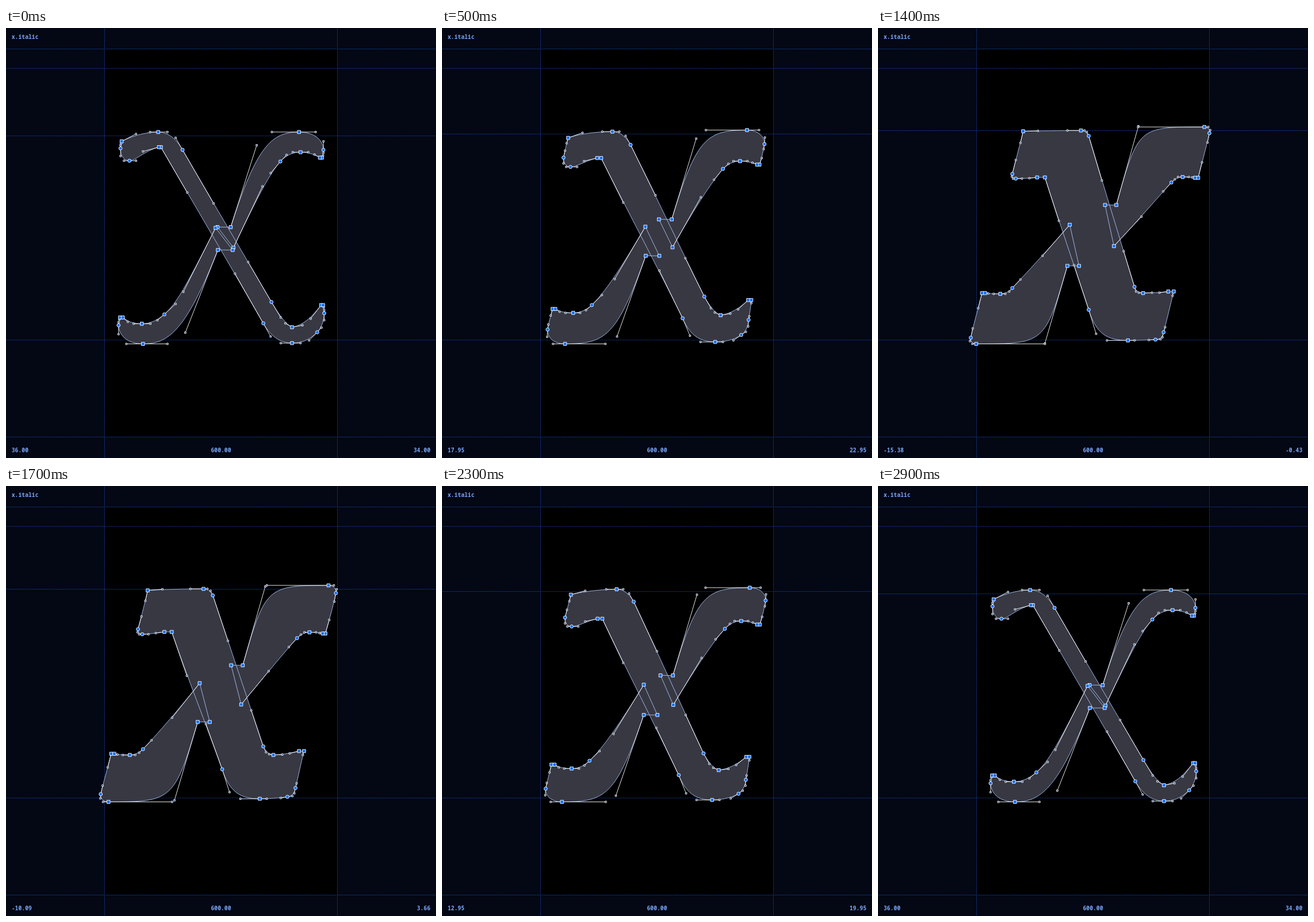
Write an HTML page with a canvas that moves like this. It is 748x748 px and loops after 3 s.

```html
<!DOCTYPE html>
<html lang="en">
<head>
<meta charset="utf-8">
<title>x.italic</title>
<style>
  html, body { margin: 0; width: 100%; height: 100%; overflow: hidden; background: #040714; }
  canvas { display: block; width: 748px; height: 748px; }
</style>
</head>
<body>
<canvas id="stage" width="748" height="748"></canvas>
<script>
const ctx = document.getElementById('stage').getContext('2d');
const SIZE = 748, SCALE = 0.675, LEFT = 171.5, BASE = 542.75, ADVANCE = 600, PAD = 9.75;

// Segments in font units: two numbers for a line, six for a curve.
// nodes: shape of each segment's end node (s = square, c = circle).
const glyph = [
  {
    nodes: 'sccsssccscssccs',
    thin: `81 531 117 536 138 536 | 162 536 183 521 201 490 | 281 352 370 201 430 98 |
      454 58 466 43 483 33 | 510 38 531 55 558 90 | 563 90 | 565 84 566 77 566 69 |
      566 51 559 32 548 20 | 527 -1 505 -8 483 -8 | 454 -8 428 9 409 43 |
      336 171 213 380 145 497 | 140 497 | 99 486 81 462 64 462 | 50 462 41 474 41 494 |
      41 502 42 506 44 512`,
    bold: `160 539 237 539.7 273 539.7 | 281 539.7 287 536 291 527 | 324 413 379 230 406 138 |
      410 127 417 124 427 123.1 | 450 124 469 124 492 126 | 506 126 | 503 115 484 32 480 19 |
      477 6 472 1 459 0 | 442 0 404 -0.6 387 -0.6 | 333 -0.6 305 16 286 79 |
      249 194 212 305 177 417 | 156 417 | 137 415 118 415.1 102 415.1 |
      95 415.1 92 419 93 426 | 103 463 115 508 122 539`
  },
  {
    nodes: 'scssscsss',
    thin: `392 502 431 536 501 536 | 544 536 564 512 564 490 | 564 482 563 475 560 470 |
      555 470 | 541 478 525 484 505 484 | 485 484 469 477 453 460 |
      428 430 407 396 332 238 | 291 291 | 325 291`,
    bold: `418 552 416 549.5 589 549.5 | 598 549.5 603 542 601 534 | 596 510 582 457 571 417 |
      563 417 | 556 417 548 418 532 418 | 520 418 512 412 503 404 |
      482 382 425 316 355 242 | 332 350 | 361.4 350`
  },
  {
    nodes: 'scssscsss',
    thin: `208 19 162 -10 99 -10 | 56 -10 36 15 36 38 | 36 46 38 53 40 58 |
      47 58 | 60 47 75 42 96 42 | 118 42 136 51 154 66 |
      183 93 203 124 286 289 | 330 232 | 292 232`,
    bold: `175 -10 176 -10 -4 -10 | -13 -10 -18.8 -4 -16.9 5 | -11 30 3 83 13 122.6 |
      21 122.6 | 29 122 43 121.6 60 121.6 | 73 121.6 82 127 90 136 |
      111 158 169 220 239 297 | 262 190 | 232 190`
  }
];

const parse = text => text.split('|').map(s => s.trim().split(/\s+/).map(Number));
for (const c of glyph) {
  c.thin = parse(c.thin);
  c.bold = parse(c.bold);
}

const mix = (a, b, t) => a + (b - a) * t;
const px = x => LEFT + x * SCALE;
const py = y => BASE - y * SCALE;

// Weight rises at a steady rate, then falls back slightly faster.
const weightAt = step => step < 15 ? step / 14.4 : (29 - step) / 13.9;

// Interpolated outline on the integer grid, with start points attached.
function outline(t) {
  return glyph.map(c => {
    const segs = c.thin.map((s, i) => s.map((v, j) => Math.round(mix(v, c.bold[i][j], t))));
    return segs.map((s, i) => {
      const prev = segs[(i + segs.length - 1) % segs.length];
      return { p: [...prev.slice(-2), ...s], node: c.nodes[i] };
    });
  });
}

// Exact horizontal extent of the outline.
function extent(contours) {
  let lo = Infinity, hi = -Infinity;
  const add = x => { lo = Math.min(lo, x); hi = Math.max(hi, x); };
  for (const { p } of contours.flat()) {
    add(p[0]);
    if (p.length < 8) continue;
    const [a, , b, , c, , d] = p;
    const A = d - 3 * c + 3 * b - a, B = 2 * (c - 2 * b + a), C = b - a;
    const root = Math.sqrt(B * B - 4 * A * C);
    const roots = A ? [(-B + root) / (2 * A), (-B - root) / (2 * A)] : [-C / B];
    for (const s of roots) {
      if (!(s > 0 && s < 1)) continue;
      const r = 1 - s;
      add(r * r * r * a + 3 * r * r * s * b + 3 * r * s * s * c + s * s * s * d);
    }
  }
  return [lo, hi];
}

function line(x1, y1, x2, y2) {
  ctx.beginPath();
  ctx.moveTo(x1, y1);
  ctx.lineTo(x2, y2);
  ctx.stroke();
}

function marker(x, y, size, round) {
  ctx.beginPath();
  if (round) ctx.arc(x, y, size / 2, 0, Math.PI * 2);
  else ctx.rect(x - size / 2, y - size / 2, size, size);
  ctx.fill();
  ctx.stroke();
}

function drawGuides(t) {
  ctx.fillStyle = '#040714';
  ctx.fillRect(0, 0, SIZE, SIZE);
  ctx.fillStyle = '#000';
  ctx.fillRect(LEFT, py(750), ADVANCE * SCALE, 1000 * SCALE);
  ctx.strokeStyle = '#1a56c4';
  ctx.lineWidth = 0.9;
  ctx.setLineDash([1.5, 1.5]);
  for (const y of [750, 700, mix(526, 540, t), 0, -250]) line(0, py(y), SIZE, py(y));
  for (const x of [0, ADVANCE]) line(px(x), 0, px(x), SIZE);
  ctx.setLineDash([]);
}

function drawGlyph(contours) {
  ctx.beginPath();
  for (const segs of contours) {
    ctx.moveTo(px(segs[0].p[0]), py(segs[0].p[1]));
    for (const { p } of segs) {
      const q = p.slice(2).map((v, i) => i % 2 ? py(v) : px(v));
      if (q.length === 2) ctx.lineTo(...q);
      else ctx.bezierCurveTo(...q);
    }
    ctx.closePath();
  }
  ctx.fillStyle = '#383843';
  ctx.fill();
  ctx.strokeStyle = '#a9c4f5';
  ctx.lineWidth = 0.9;
  ctx.stroke();

  const all = contours.flat();
  const curves = all.filter(s => s.p.length === 8);
  ctx.strokeStyle = '#fff';
  for (const { p } of curves) {
    line(px(p[0]), py(p[1]), px(p[2]), py(p[3]));
    line(px(p[4]), py(p[5]), px(p[6]), py(p[7]));
  }
  ctx.fillStyle = '#0a2c66';
  for (const { p } of curves) {
    marker(px(p[2]), py(p[3]), 2.7);
    marker(px(p[4]), py(p[5]), 2.7);
  }
  ctx.fillStyle = '#0a6cff';
  for (const { p, node } of all) {
    const [x, y] = p.slice(-2);
    marker(px(x), py(y), node === 'c' ? 5.8 : 5.6, node === 'c');
  }
}

function label(text, x, y, align) {
  ctx.textAlign = align;
  ctx.fillText(text, x, y);
}

function drawLabels(lo, hi) {
  ctx.font = '600 9.75px "Noto Sans Mono", "DejaVu Sans Mono", monospace';
  ctx.fillStyle = '#78a5f5';
  label('x.italic', PAD, 19, 'left');
  label(lo.toFixed(2), PAD, 738, 'left');
  label(ADVANCE.toFixed(2), SIZE / 2, 738, 'center');
  label((ADVANCE - hi).toFixed(2), SIZE - PAD, 738, 'right');
}

let shown = -1;
const start = performance.now();

function tick() {
  const step = Math.floor((performance.now() - start) % 3000 / 100);
  if (step !== shown) {
    shown = step;
    const t = weightAt(step);
    const contours = outline(t);
    drawGuides(t);
    drawGlyph(contours);
    drawLabels(...extent(contours));
  }
  requestAnimationFrame(tick);
}
tick();
</script>
</body>
</html>
```
